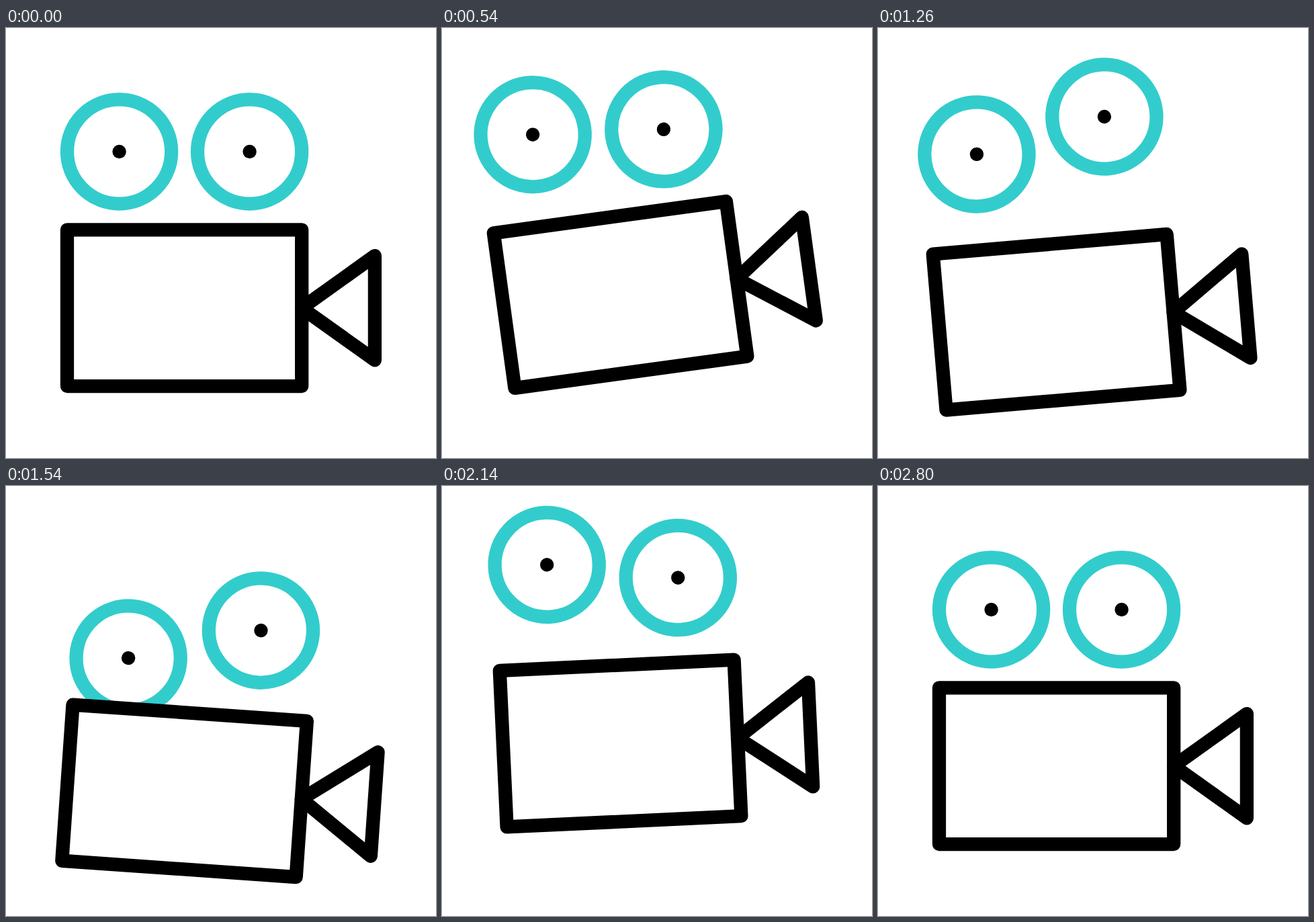
Recreate the animation shown at these times as an HTML page. Size 640 by 640 pixels, loop 4000 ms.

```html
<!DOCTYPE html>
<html lang="en">
<head>
<meta charset="utf-8">
<title>Film camera</title>
<style>
  html, body { margin: 0; height: 100%; overflow: hidden; background: #fff; }
  svg { display: block; width: 100%; height: 100%; }
</style>
</head>
<body>
<svg viewBox="0 0 640 640" fill="#fff" stroke="#000" stroke-width="20.3" stroke-linejoin="round">
  <defs>
    <g id="reel">
      <circle r="77.6" stroke="#3cc"/>
      <circle r="10.2" fill="#000" stroke="none"/>
    </g>
  </defs>
  <g id="camera">
    <use id="left" href="#reel"/>
    <use id="right" href="#reel"/>
    <rect x="-174.6" y="-116.4" width="349.2" height="232.8"/>
    <path d="M174.6 0 283.3-77.6V77.6Z" fill="none"/>
  </g>
</svg>
<script>
const LOOP = 4000, POSES = 42;
const [camera, left, right] = ['camera', 'left', 'right'].map(id => document.getElementById(id));

const ease = p => p * p * (3 - 2 * p);

// Swings from 0 through each peak and back to 0; times are in 1/60 s.
function swing(t, peaks, first, second, third, last) {
  const legs = [first, second, third, last];
  let from = 0;
  for (let i = 0; i < 4; i++) {
    const to = peaks[i] || 0;
    if (t < legs[i]) return from + (to - from) * ease(Math.max(0, t) / legs[i]);
    t -= legs[i];
    from = to;
  }
  return 0;
}

const lift = (t, peaks) => swing(t, peaks, 52, 30, 30, 30);

function place(part, x, y, angle = 0) {
  part.setAttribute('transform', `translate(${x} ${y}) rotate(${angle})`);
}

function draw(now) {
  // 15 poses per second, switching on 20 ms ticks, then a rest
  const tick = Math.floor(now % LOOP / 20);
  const t = 4 * Math.min(POSES, Math.floor((tick + .5) * .3));
  const drop = swing(t, [-33.4, 41.7, -34.1], 57, 29, 40, 30);
  const tilt = swing(t, [-13.15, 4.75, -3.75], 57, 40, 40, 31);
  place(camera, 265.6, 416.7 + drop, tilt);
  place(left, -97, -232.7 - lift(t - 12, [63.8, -42.6, 39.8]));
  place(right, 97, -232.7 - lift(t - 26, [66.2, -51, 30.9]));
}

const start = performance.now();
function loop() {
  draw(performance.now() - start);
  requestAnimationFrame(loop);
}
loop();
</script>
</body>
</html>
```
